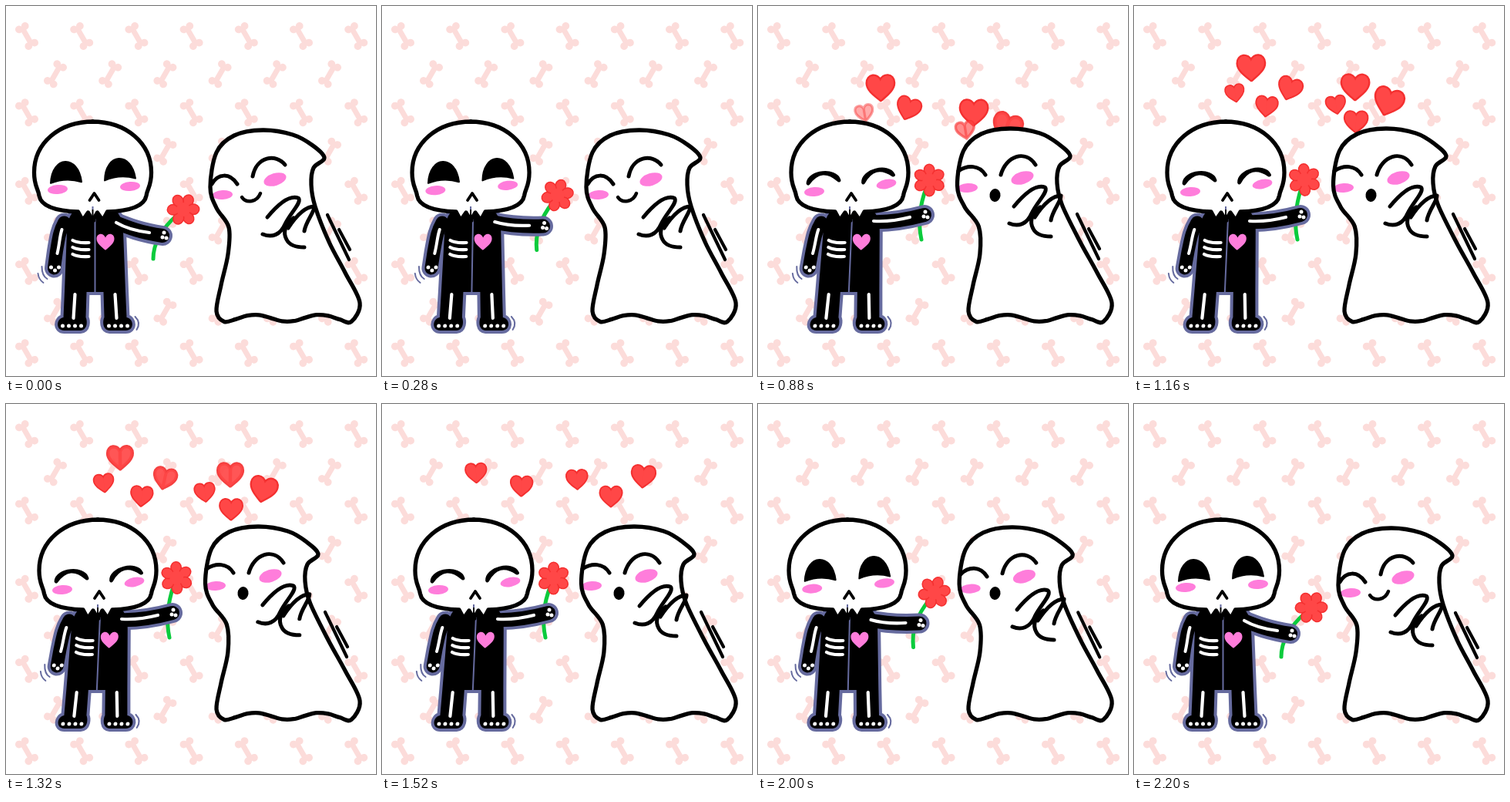
Write an HTML page with a canvas that moves like this. It is 480 by 480 pixels and loops after 2.24 s.

```html
<!DOCTYPE html>
<html lang="en">
<head>
<meta charset="utf-8">
<title>Skeleton and ghost</title>
<style>
html, body { margin: 0; width: 100%; height: 100%; overflow: hidden; background: #fff; }
canvas { display: block; width: 480px; height: 480px; }
</style>
</head>
<body>
<canvas id="stage" width="480" height="480"></canvas>
<script>
const ctx = document.getElementById('stage').getContext('2d');
const LOOP = 2240, STEP = 40, TAU = Math.PI * 2;
const INK = '#000', PINK = '#ff7ddb', EDGE = '#666b9f', BONE = '#fcdcda', RED = '#ff4747', DARKRED = '#f43030';

const clamp = v => Math.max(0, Math.min(1, v));
const lerp = (a, b, k) => a + (b - a) * k;
const mix = (a, b, k) => a.map((v, i) => lerp(v, b[i], k));
const ease = (a, b, t) => { const k = clamp((t - a) / (b - a)); return k * k * (3 - 2 * k); };
const hold = (t, a, b, c, d) => ease(a, b, t) * (1 - ease(c, d, t));

function stroke(path, color, width) {
  ctx.strokeStyle = color;
  ctx.lineWidth = width;
  ctx.stroke(path);
}
function fill(path, color) {
  ctx.fillStyle = color;
  ctx.fill(path);
}
const draw = (d, color, width) => stroke(new Path2D(d), color, width);
const bar = (x, y, x2, y2, color, width) => draw(`M${x} ${y}L${x2} ${y2}`, color, width);
const curve = p => new Path2D(`M${p.slice(0, 2)}C${p.slice(2)}`);
function oval(x, y, rx, ry, rot, color) {
  const path = new Path2D();
  path.ellipse(x, y, rx, ry, rot, 0, TAU);
  fill(path, color);
}
const dot = (x, y) => oval(x, y, 2.5, 2.5, 0, '#fff');

function local(x, y, rot, paint) {
  ctx.save();
  ctx.translate(x, y);
  ctx.rotate(rot);
  paint();
  ctx.restore();
}
// A shape and its reflection about x = 0.
function mirrored(d) {
  const half = new Path2D(d), path = new Path2D(half);
  path.addPath(half, new DOMMatrix([-1, 0, 0, 1, 0, 0]));
  return path;
}
// Smooth closed curve through [x, y] points.
function spline(pts) {
  const n = pts.length, at = i => pts[(i + n) % n], path = new Path2D();
  path.moveTo(...pts[0]);
  for (let i = 0; i < n; i++) {
    const [a, b, c, d] = [-1, 0, 1, 2].map(j => at(i + j));
    path.bezierCurveTo(b[0] + (c[0] - a[0]) / 6, b[1] + (c[1] - a[1]) / 6,
      c[0] - (d[0] - b[0]) / 6, c[1] - (d[1] - b[1]) / 6, ...c);
  }
  path.closePath();
  return path;
}

const heartShape = mirrored('M0 .43C.2 .26 .46 .08 .46-.16C.46-.46 .1-.5 0-.22Z');
function heart(x, y, size, rot, color, edge) {
  local(x, y, rot, () => {
    ctx.scale(size, size);
    if (edge) stroke(heartShape, edge, 0.13);
    fill(heartShape, color);
  });
}

function bone(x, y, rot) {
  local(x, y, rot, () => {
    bar(0, -11, 0, 11, BONE, 7);
    for (const sx of [-4.5, 4.5]) for (const sy of [-12.5, 12.5]) oval(sx, sy, 4.9, 4.9, 0, BONE);
  });
}
function backdrop() {
  ctx.fillStyle = '#fff';
  ctx.fillRect(0, 0, 480, 480);
  for (let row = 0; row < 9; row++) {
    const odd = row % 2, y = 39 + row * 49 + row * row * 0.3;
    for (let i = 0; i < 7 - odd; i++) bone(27 + 37 * odd + 71.2 * i, y, odd ? 0.52 : -0.52);
  }
}

// Hearts are [x, y, size] at the moment PEAK; they rise and spread from each head.
const PEAK = 1160;
const emitters = [
  { x: 155, line: 138, from: 560, end: 1900, rise: 0.066,
    hearts: [[152, 80, 37], [202, 107, 32], [131, 113, 25], [172, 130, 29]] },
  { x: 285, line: 162, from: 660, end: 1760, rise: 0.084,
    hearts: [[287, 105, 37], [330, 124, 39], [262, 128, 26], [288, 150, 31]] }
];
function hearts(t) {
  const dt = t - PEAK;
  for (const e of emitters) for (const [x, y, size] of e.hearts) {
    const rise = e.rise * (dt < 0 ? 1.4 : 1);
    const start = Math.max(e.from, PEAK - 60 - (e.line - y) / e.rise / 1.4);
    const end = y < 110 ? 1430 : e.end;
    if (t <= start || t >= end) continue;
    const side = Math.sign(x - e.x), aged = clamp(dt / 500);
    const shrink = 1 - 0.15 * clamp((t - 1520) / 320);
    ctx.globalAlpha = clamp((t - start) / 110) * clamp((end - t) / 120);
    heart(x + side * 0.025 * dt, y - rise * dt, lerp(size, 29, aged) * shrink,
      (x - e.x) * 0.007 * (1 - aged), RED, DARKRED);
    ctx.globalAlpha = 1;
  }
}

function flower(k, sway) {
  const [x, y] = mix([230, 264], [225, 227], k);
  const lift = 5.6 * k * (1 - k);
  const stem = mix([191, 328, 191, 308, 203, 288, 222, 271], [212, 303, 207, 280, 210, 258, 221, 236], k);
  stem[6] += sway;
  stroke(curve(stem), '#0bcb3c', 5);
  local(x + sway, y + sway * 0.4 - lift, lerp(0.5, 0.1, k) + sway * 0.04, () => {
    for (let i = 0; i < 6; i++) {
      local(0, 0, i * TAU / 6, () => {
        const petal = new Path2D();
        petal.ellipse(0, -13, 6, 7, 0, 0, TAU);
        stroke(petal, DARKRED, 3);
        fill(petal, RED);
      });
    }
    oval(0, 0, 9, 9, 0, RED);
  });
}

const torso = mirrored('M-1 264L25 264C33 270 36 280 36.5 292L39.5 370L41 404C51 406 51 421 40 421L19 421C9 420 10 408 12 404L11 371L-1 371Z');
const leftArm = new Path2D('M-40 281C-46 292-47 300-50 318L-53 340');

function body(k, arm) {
  const reach = curve(mix([140, 280, 160, 288, 175, 294, 203, 298], [146, 280, 168, 281, 190, 278, 216, 271], arm));
  const shear = 6.5 * k / 150;
  const leaning = paint => {
    ctx.save();
    ctx.transform(1, 0, -shear, 1, 115.5 + 425 * shear, 0);
    paint();
    ctx.restore();
  };
  leaning(() => {
    stroke(torso, EDGE, 8);
    stroke(leftArm, EDGE, 25);
  });
  stroke(reach, EDGE, 26);
  leaning(() => {
    stroke(leftArm, INK, 17);
    fill(torso, INK);
  });
  stroke(reach, INK, 18);
  leaning(() => {
    draw('M-43 290C-46 299-46 309-49 321', '#fff', 4);
    for (let i = 0; i < 3; i++) {
      dot(-57 + 5 * i, 339 + 4 * (i % 2));
      const y = 304 + 9 * i;
      draw(`M-29 ${y}C-22 ${y + 4}-15 ${y + 3}-8 ${y + 3}`, '#fff', 4.2);
    }
    heart(13.5, 306, 25, 0, PINK);
    for (const side of [-1, 1]) {
      bar(side * 26, 374, side * 28, 405, '#fff', 4.2);
      for (let i = 0; i < 4; i++) dot(side * (18 + 8 * i), 415);
    }
    draw('M-74 347Q-73 355-67 359M-69 338Q-69 350-62 354M52 403Q60 411 54 420', EDGE, 2);
  });
  stroke(curve(mix([143, 281, 155, 288, 169, 292, 186, 294], [150, 279, 165, 280, 181, 278, 197, 274], arm)), '#fff', 4.2);
  const [hx, hy] = mix([205, 298], [217, 271], arm);
  dot(hx, hy - 4);
  dot(hx - 2, hy + 2);
  dot(hx + 3, hy + 3);
}

const skull = mirrored('M-1 150C44 150 76 178 76 216C76 234 71 236 69.5 246C67 260 46 266 19 267L13 278L6 268L0 278L-1 278');

function eye(from, to, open) {
  const [x, y, tilt] = mix(to, from, open);
  const top = -lerp(15, 36, open), low = lerp(-22, -7, open);
  local(x, y, tilt, () => {
    const path = new Path2D(`M-20 0C-17 ${top} 17 ${top} 20 0Q0 ${low}-20 0Z`);
    fill(path, INK);
    stroke(path, INK, lerp(5, 2, open));
  });
}
function head(k, open) {
  local(112.5 + 6.5 * k, 0, 0, () => {
    fill(skull, '#fff');
    stroke(skull, INK, 5.3);
    draw('M-4 252L2 243L8 252', INK, 3.8);
  });
  eye([78 + 5 * k, 229, -0.04], [85, 228, -0.1], open);
  eye([148 + 6 * k, 225, -0.07], [156, 224, -0.25], open);
  const [lx, ly, rx, ry] = mix([67, 238, 161, 234], [73, 241, 166.5, 231], k);
  oval(lx, ly, 13, 6, -0.08, PINK);
  oval(rx, ry, 13, 6, lerp(-0.08, -0.2, k), PINK);
}

// Ghost outline: key points above, a cosine wave along the hem.
const hem = Array.from({ length: 12 }, (_, i) => {
  const x = 448 - 15 * i;
  return [x, 405 - 4.5 * Math.cos(TAU * (x - 323) / 84)];
});
const sheet = [
  [265, 235], [273, 190], [296, 168], [333, 161], [372, 167], [398, 181], [413, 197], [399, 210],
  [396, 232], [401, 260], [419, 306], [440, 346], [459, 385], ...hem,
  [273, 396], [279, 362], [288, 322], [289, 287], [273, 262]
];
function ghost(k, t) {
  const outline = spline(sheet.map(([x, y]) => {
    const w = k * (1 - ease(232, 330, y));
    return [x - w * (x > 380 ? 8 : 6.5), y - w * 2];
  }));
  fill(outline, '#fff');

  const [lx, ly, rx, ry] = mix([281, 245, 349, 225], [272, 236, 343, 223], k);
  oval(lx, ly, 13, 6, -0.06, PINK);
  oval(rx, ry, 15, 8, -0.3, PINK);
  stroke(outline, INK, 5.3);

  stroke(curve(mix([267, 231, 275, 217, 290, 216, 300, 231], [260, 214, 272, 206, 287, 206, 295, 219], k)), INK, 5);
  stroke(curve(mix([320, 221, 325, 195, 350, 191, 362, 206], [315, 219, 322, 194, 347, 186, 360, 206], k)), INK, 5);
  if (k < 0.5) draw('M306 248C312 257 326 254 330 243', INK, 4.5);
  else oval(307.5, 245.5, 7, 8.5, 0.1, INK);

  const spread = 2 * k * ease(1200, 1480, t);
  local(spread - 7 * k, spread - 14 * k, 0, () => {
    draw('M339 274C353 257 368 245 379 249C385 254 369 268 362 283C356 297 345 301 333 296', INK, 5);
    draw('M373 275C361 285 359 294 364 303C368 311 378 313 387 313', INK, 5);
    draw('M366 288C376 273 388 260 400 260C400 268 389 279 387 292', INK, 5);
  });
  local(-3 * k, -k, 0, () => {
    bar(417, 271, 445, 329, INK, 4.2);
    bar(432, 290, 446, 316, INK, 4.2);
  });
}

function render(t) {
  const lean = hold(t, 40, 600, 1830, 2190);
  const arm = hold(t, 0, 590, 1810, 2190);
  const kiss = hold(t, 300, 580, 1860, 2180);
  const open = 1 - hold(t, 270, 540, 1720, 1960);
  const sway = t > 600 ? -4 * Math.sin(Math.PI * (t - 600) / 1160) * arm : 0;
  ctx.lineCap = ctx.lineJoin = 'round';
  backdrop();
  hearts(t);
  ghost(kiss, t);
  flower(arm, sway);
  body(lean, arm);
  head(lean, open);
}

const begin = performance.now();
function frame() {
  const t = (performance.now() - begin) % LOOP;
  render(Math.floor(t / STEP) * STEP);
  requestAnimationFrame(frame);
}
frame();
</script>
</body>
</html>
```
